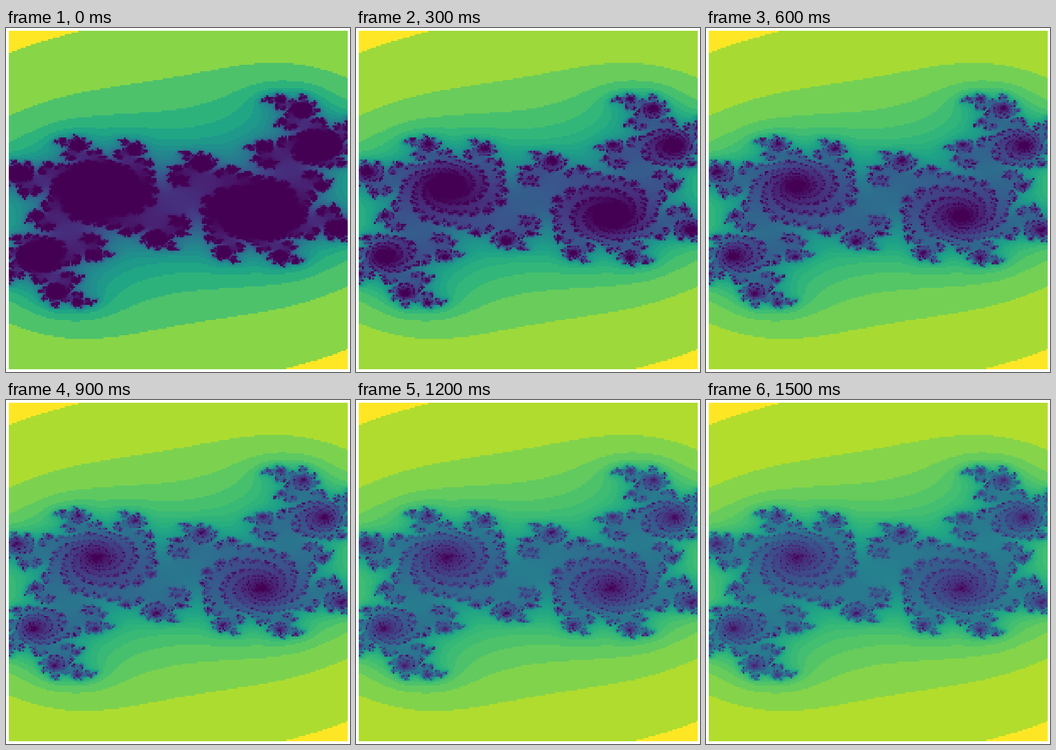
A matplotlib script that plays this animation: 748 by 748 pixels, repeating every 1.8 s.

```python
import numpy as np
import matplotlib.pyplot as plt
from matplotlib.animation import FuncAnimation

SIZE, PAD, DPI = 748, 6, 100
CELLS = 200
C = 0.355 + 0.355j
RADIUS = 10
LIMITS = np.linspace(50, 400, 6).astype(int)
FRAME_MS = 300


def escape_times(limit):
    """Index of the first iterate of z -> z^2 + C outside RADIUS, per cell."""
    u = 2 * np.arange(CELLS) / CELLS - 1
    z = 1.5 * u[:, None] + 1j * u[None, :]
    times = np.full(z.shape, limit)
    alive = np.ones(z.shape, bool)
    for i in range(limit):
        z[alive] = z[alive] ** 2 + C
        out = alive & (np.abs(z) > RADIUS)
        times[out] = i
        alive &= ~out
    return np.maximum(times, 1)


def shade(limit):
    return 1 - np.log(np.minimum(times, limit)) / np.log(limit)


times = escape_times(LIMITS[-1])

fig = plt.figure(figsize=(SIZE / DPI, SIZE / DPI), dpi=DPI, facecolor="white")
edge = PAD / SIZE
ax = fig.add_axes([edge, edge, 1 - 2 * edge, 1 - 2 * edge])
ax.axis("off")
image = ax.imshow(shade(LIMITS[0]), cmap="viridis", vmin=0, vmax=1,
                  interpolation="nearest", aspect="auto")


def draw(k):
    image.set_data(shade(LIMITS[k % len(LIMITS)]))
    return [image]


anim = FuncAnimation(fig, draw, frames=len(LIMITS), interval=FRAME_MS,
                     repeat=True, repeat_delay=0)
plt.show()
```
